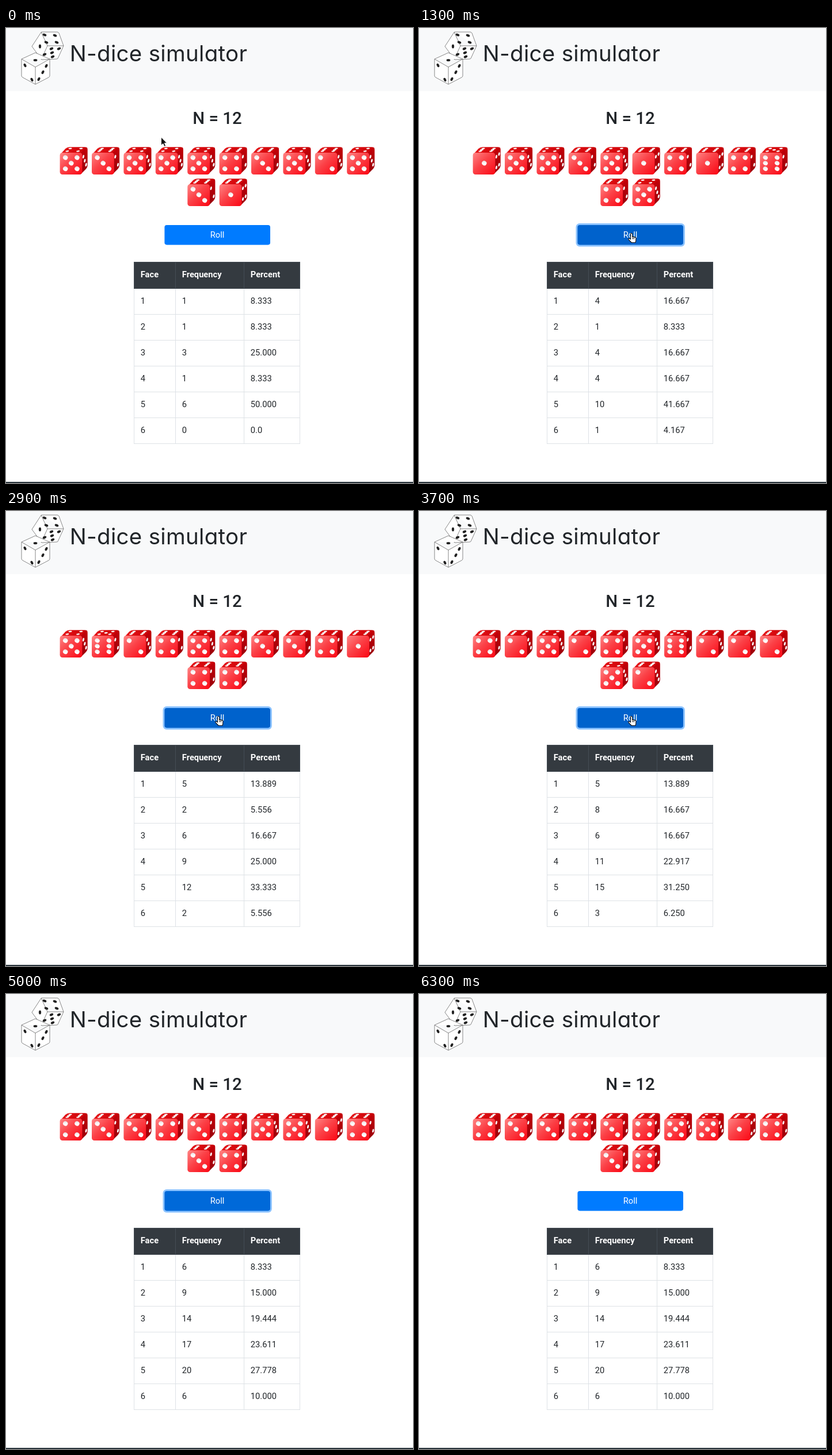
Write an HTML page that moves like this. It is 707 by 792 pixels and loops after 8 s.

```html
<!DOCTYPE html>
<html lang="en">
<head>
<meta charset="utf-8">
<title>Dice simulator</title>
<style>
  html, body { margin: 0; width: 100%; height: 100%; overflow: hidden; background: #fff; }
  svg { display: block; width: 707px; height: 792px; }
  text { font: 14.7px Roboto, sans-serif; fill: #212529; }
  .title { font: 38.5px Inter, sans-serif; font-optical-sizing: none; font-feature-settings: "cv11"; letter-spacing: .3px; }
  .count { font-size: 29.4px; font-weight: 500; text-anchor: middle; }
  .head { font-weight: 700; fill: #fff; }
  .label { fill: #fff; text-anchor: middle; }
</style>
</head>
<body>
<svg id="stage" viewBox="0 0 707 792">
  <defs>
    <linearGradient id="front" x1="0" y1="0" x2="1" y2="1">
      <stop offset="0" stop-color="#ff8585"/>
      <stop offset=".45" stop-color="#fb4248"/>
      <stop offset="1" stop-color="#fb0714"/>
    </linearGradient>
    <linearGradient id="top" x1="0" y1="0" x2="1" y2="0">
      <stop offset="0" stop-color="#e81418"/>
      <stop offset="1" stop-color="#c80006"/>
    </linearGradient>
    <linearGradient id="side" x1="0" y1="0" x2="0" y2="1">
      <stop offset="0" stop-color="#c40008"/>
      <stop offset="1" stop-color="#98000a"/>
    </linearGradient>
    <linearGradient id="pip" x1="0" y1="0" x2="1" y2="1">
      <stop offset="0" stop-color="#e2d4d4"/>
      <stop offset=".6" stop-color="#fff"/>
    </linearGradient>
  </defs>

  <rect width="707" height="110" fill="#f8f9fa"/>
  <g id="icon" fill="#fff" stroke="#555" stroke-width=".7" stroke-linejoin="round">
    <path d="M62 7H89Q91 7 92 9L100 31 90 53Q89 54 87 54L62 55 45 32 60 9Q61 7 62 7ZM61 7 72 31H100M72 31 61 55"/>
    <path d="M51 43 76 54V83Q76 85 74 86L51 98 29 86Q27 85 27 83V54ZM27 54 51 68 76 54M51 68V98"/>
  </g>
  <text class="title" x="110.7" y="58">N-dice simulator</text>
  <text class="count" x="367" y="167">N = 12</text>
  <g id="dice"></g>

  <rect id="ring" x="272.5" y="340" width="189.4" height="40.4" rx="6.5" fill="#007bff"/>
  <rect id="button" x="275.4" y="343" width="183.6" height="34.4" rx="3.8"/>
  <text class="label" x="367" y="365">Roll</text>

  <rect x="222" y="407" width="289" height="46.5" fill="#343a40"/>
  <g id="table"></g>
  <rect y="790" width="707" height="2" fill="#29343c"/>

  <path id="arrow" d="M0 0V14.2L3.3 11.2 5.6 16.3 8 15.2 5.8 10.3H10Z" fill="#111" stroke="#fff" stroke-width=".9"/>
  <path id="hand" fill="#fff" stroke="#111" stroke-width="1.1" stroke-linejoin="round"
    d="M-1.5 9.8V1.2a1.5 1.5 0 0 1 3 0V6q1.4-.9 2.4.4 1.3-.7 2.1.5 1.8-.4 1.8 1.4V12q0 2-1 4H.2L-5 10.6q-.6-1.6.8-1.8 1.2 0 2.7 1.6zM2 7v3M4.4 7.5V10"/>
</svg>
<script>
const $ = id => document.getElementById(id);
const add = (parent, tag, attrs, text = '') => {
  const el = document.createElementNS('http://www.w3.org/2000/svg', tag);
  for (const key in attrs) el.setAttribute(key, attrs[key]);
  el.textContent = text;
  return parent.appendChild(el);
};

// Pip positions on a unit face
const corners = [[0, 0], [1, 1], [1, 0], [0, 1]];
const mids = [[0, .5], [1, .5]];
const pips = n => [
  ...(n % 2 ? [[.5, .5]] : []),
  ...corners.slice(0, n > 3 ? 4 : n > 1 ? 2 : 0),
  ...(n === 6 ? mids : [])
].map(([u, v]) => [.24 + .52 * u, .24 + .52 * v]);

const TOP = [6, 6, 6, 6, 4, 5];
const SIDE = [4, 3, 2, 2, 3, 2];

function buildDie(n) {
  const die = add($('stage').querySelector('defs'), 'g', { id: 'die' + n });
  const dot = (cx, cy, rx, ry, tilt = 0) => add(die, 'ellipse',
    { cx, cy, rx, ry, fill: 'url(#pip)', transform: `rotate(${tilt} ${cx} ${cy})` });
  add(die, 'path', { d: 'M1 13 10 3Q13 .3 17 .3H44Q47 .3 48 2L38 13Z', fill: 'url(#top)' });
  add(die, 'path', { d: 'M36 11 46 1Q48.4 1 48.4 5V32Q48.4 35 46 38L37 47Z', fill: 'url(#side)' });
  add(die, 'rect', { x: .3, y: 10, width: 38.8, height: 38, rx: 4.5, fill: 'url(#front)' });
  for (const [u, v] of pips(n)) dot(.5 + 39 * u, 9.5 + 37.5 * v, 4.2, n === 6 ? 3.7 : 4, 35);
  for (const [u, v] of pips(TOP[n - 1])) dot(2 + 36 * u + 10 * (1 - v), .6 + 9 * v, 3.1, 1.3, -6);
  for (const [u, v] of pips(SIDE[n - 1])) dot(39 + 9 * u, 10.5 - 9 * u + 36 * v, 1.5, 3.2, 10);
}
for (let n = 1; n <= 6; n++) buildDie(n);

const dice = Array.from({ length: 12 }, (_, i) => add($('dice'), 'use', i < 10
  ? { x: 93.3 + 55.4 * i, y: 207 }
  : { x: 315 + 55.4 * (i - 10), y: 262 }));

// Header icon pips: x, y, tilt
[[67, 12, 20], [85, 13, 20], [70, 25, 20], [88, 25, 20], [59, 32, 90],
 [79, 36, -25], [92, 36, -25], [80, 43, -25], [67, 46, -25], [81, 50, -25],
 [51, 56, 0], [33, 65, 62], [45, 90, 62], [70, 66, -62], [64, 77, -62], [57, 89, -62]]
  .forEach(([cx, cy, a]) => add($('icon'), 'ellipse',
    { cx, cy, rx: 3.4, ry: 2.1, fill: '#222', stroke: 'none', transform: `rotate(${a} ${cx} ${cy})` }));

// Table grid and cells
const COLS = [222.5, 294.5, 413.5, 510.5];
const rowY = r => 453.5 + 45 * r;
for (let r = 0; r <= 6; r++) add($('table'), 'path', { d: `M222 ${rowY(r)}H511`, stroke: '#dee2e6' });
for (const x of COLS) {
  add($('table'), 'path', { d: `M${x} 453V724`, stroke: '#dee2e6' });
  add($('table'), 'path', { d: `M${x} 407V454`, stroke: '#454d55' });
}
add($('table'), 'path', { d: 'M222 407.5H511M222 453.5H511', stroke: '#454d55' });

const cell = (col, y, text, cls = '') =>
  add($('table'), 'text', { x: COLS[col] + 11.3, y, class: cls }, text);
['Face', 'Frequency', 'Percent'].forEach((name, i) => cell(i, 434.4, name, 'head'));
const rows = Array.from({ length: 6 }, (_, r) => [r + 1, 0, ''].map((v, c) => cell(c, rowY(r) + 26.5, v)));

// Each roll: tick (100 ms) and faces; a percent is refreshed only when its face comes up
const ROLLS = [[0, '535554352531'], [13, '155351414645'], [22, '562454334144'],
  [30, '425245622252'], [38, '533653563264'], [46, '433434551434']];
const freq = Array(6).fill(0), percent = Array(6).fill('0.0');
const states = ROLLS.map(([at, faces], i) => {
  for (const f of faces) freq[f - 1]++;
  freq.forEach((n, k) => {
    if (faces.includes(k + 1)) percent[k] = (n / (12 * (i + 1)) * 100).toFixed(3);
  });
  return { at, faces, freq: [...freq], percent: [...percent] };
});

// Button: tick, colour, ring opacity
const IDLE = '#007bff', HOVER = '#0069d9', DOWN = '#0062cc', MID = '#0066d2';
const BUTTON = [[0, IDLE, 0], [7, '#0071ea', 0], [8, HOVER, 0], [12, MID, .25], [13, DOWN, .45],
  [14, HOVER, .45], [20, MID, .45], [21, DOWN, .45], [23, HOVER, .45], [28, MID, .45], [29, DOWN, .45],
  [31, HOVER, .45], [37, DOWN, .45], [39, HOVER, .45], [45, DOWN, .45], [47, HOVER, .45],
  [62, '#0072ec', .2], [63, IDLE, 0]];

function pointer(tick) {
  if (tick >= 50) return null;
  if (tick >= 48) return tick === 48 ? [379, 214] : [389, 67];
  const p = Math.min(tick / 8, 1), e = p * p * (3 - 2 * p);
  return [269.5 + 99.5 * e, 190 + 167.5 * e];
}

function place(el, pos) {
  el.setAttribute('visibility', pos ? 'visible' : 'hidden');
  if (pos) el.setAttribute('transform', `translate(${pos})`);
}

let shown = -1;
function draw(tick) {
  if (tick === shown) return;
  shown = tick;
  const state = states.findLast(s => s.at <= tick);
  dice.forEach((die, i) => die.setAttribute('href', '#die' + state.faces[i]));
  rows.forEach((row, i) => {
    row[1].textContent = state.freq[i];
    row[2].textContent = state.percent[i];
  });
  const [, fill, ring] = BUTTON.findLast(b => b[0] <= tick);
  $('button').setAttribute('fill', fill);
  $('ring').setAttribute('opacity', ring);
  const pos = pointer(tick), over = pos && pos[1] > 343;
  place($('arrow'), over ? null : pos);
  place($('hand'), over ? pos : null);
}

const start = performance.now();
function frame() {
  draw(Math.floor((performance.now() - start) % 8000 / 100));
  requestAnimationFrame(frame);
}
frame();
</script>
</body>
</html>
```
